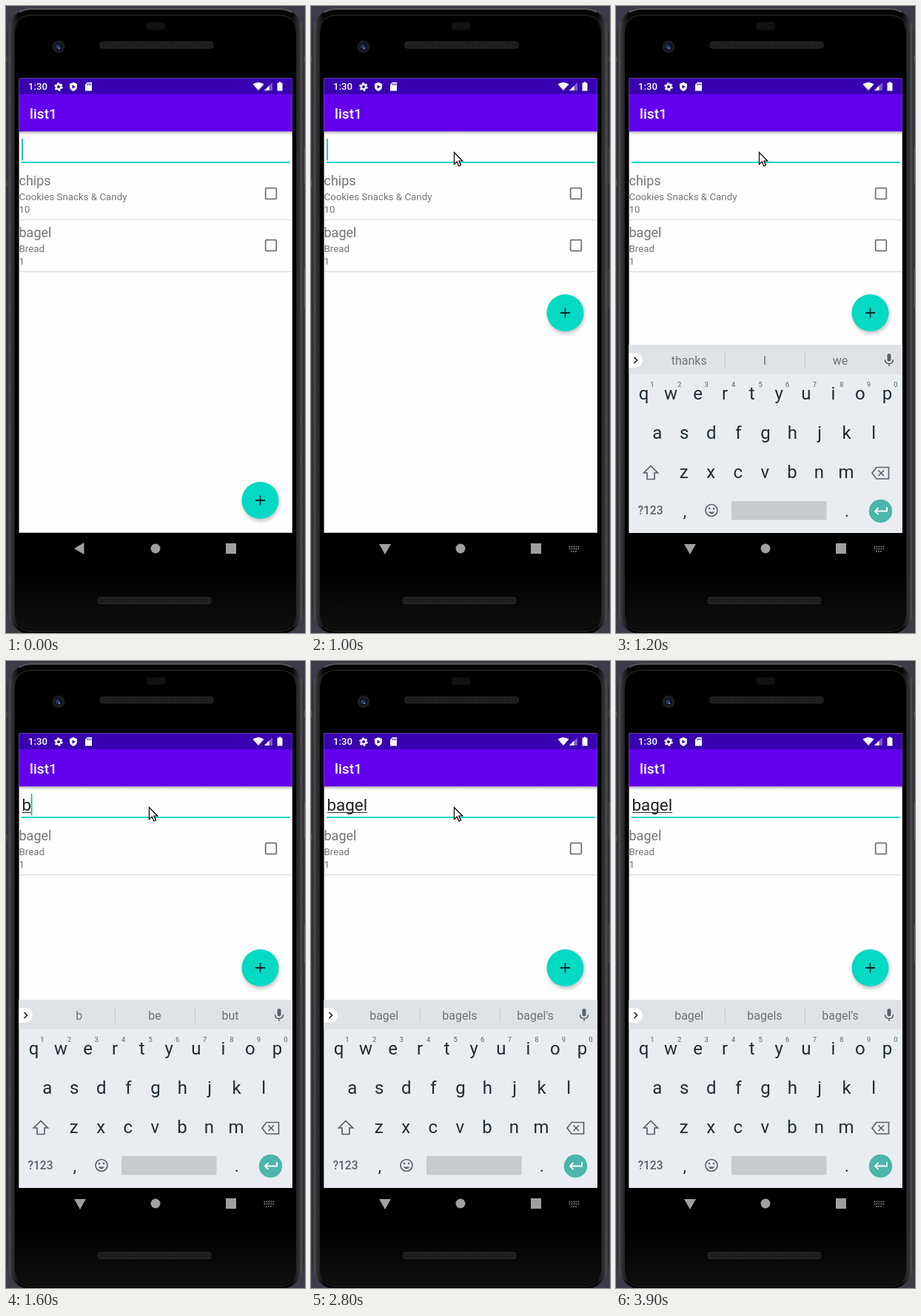
An HTML page that plays this animation: 404 px wide and 846 px high, repeating every 4000 ms.

```html
<!DOCTYPE html>
<html lang="en">
<head>
<meta charset="utf-8">
<title>Shopping list search</title>
<style>
  html, body { margin: 0; width: 100%; height: 100%; overflow: hidden; background: #3b3c48; }
  svg { display: block; width: 404px; height: 846px; font-family: Roboto, sans-serif; }
  .mid { text-anchor: middle; }
  .line { fill: none; stroke: #59636a; stroke-width: 1.7; }
</style>
</head>
<body>
<svg viewBox="0 0 404 846">
  <defs>
    <linearGradient id="side">
      <stop offset="0" stop-color="#242427"/>
      <stop offset=".008" stop-color="#4c4c50"/>
      <stop offset=".018" stop-color="#303033"/>
      <stop offset=".04" stop-color="#050505"/>
      <stop offset=".96" stop-color="#050505"/>
      <stop offset=".982" stop-color="#303033"/>
      <stop offset=".992" stop-color="#4c4c50"/>
      <stop offset="1" stop-color="#242427"/>
    </linearGradient>
    <linearGradient id="chin" x2="0" y2="1">
      <stop offset="0" stop-color="#000"/>
      <stop offset="1" stop-color="#101011"/>
    </linearGradient>
    <linearGradient id="drop" x2="0" y2="1">
      <stop offset="0" stop-opacity=".28"/>
      <stop offset="1" stop-opacity="0"/>
    </linearGradient>
    <pattern id="mesh" width="3" height="3" patternUnits="userSpaceOnUse">
      <path d="M0 0h3v3h-3z" fill="#171717"/><path d="M0 0h1.5v1.5h-1.5z" fill="#303030"/>
    </pattern>
    <filter id="soft" x="-30%" y="-30%" width="160%" height="160%"><feGaussianBlur stdDeviation="2.5"/></filter>
    <clipPath id="screen"><path d="M17.6 97H386.800V715H17.600z"/></clipPath>
  </defs>

  <!-- phone body -->
  <path d="M0 68h4v8h-4zM0 234h6v9h-6zM400 67h4v9h-4zM399 190h5v50h-5zM399 355h5v52h-5z" fill="#55555a"/>
  <rect x="1.500" y="3" width="401" height="845" rx="34" fill="url(#side)"/>
  <path d="M18 8.500Q24 4 36 4H368Q380 4 386 8.500" fill="none" stroke="#58585c" stroke-width="2"/>
  <rect x="7.500" y="12.500" width="389" height="831" rx="26" fill="none" stroke="#2d2d30"/>
  <rect x="12" y="13" width="380" height="829" rx="24" fill="#000"/>
  <path d="M12 765H392V815Q392 842 367 842H37Q12 842 12 815z" fill="url(#chin)"/>
  <rect x="190" y="22" width="25" height="10" rx="3" fill="#111"/>
  <g fill="url(#mesh)" stroke="#2c2c2c">
    <rect x="127" y="48.5" width="153" height="8.5" rx="3"/>
    <rect x="124" y="798" width="153" height="8.5" rx="3"/>
  </g>
  <circle cx="71" cy="55" r="8.5" fill="#1c1c20"/>
  <circle cx="71" cy="55" r="5" fill="#10131f"/>
  <circle cx="70" cy="55" r="2.8" fill="#283868"/>
  <circle cx="72" cy="57" r="1.2" fill="#7486b4"/>

  <!-- app -->
  <g clip-path="url(#screen)">
    <path d="M17 97.500H388V710.800H17z" fill="#fefefe"/>
    <path d="M17 169H388V174H17z" fill="url(#drop)"/>
    <path d="M17 97.500H388V119H17z" fill="#3900b1"/>
    <path d="M17 119H388V169.300H17z" fill="#6200ee"/>
  </g>
  <g fill="#fff">
    <text x="30" y="113.3" font-size="13.2" font-weight="500">1:30</text>
    <text x="32" y="151.5" font-size="19.2" font-weight="500">list1</text>
    <g fill="none" stroke="#fff">
      <circle cx="71" cy="109" r="3.2" stroke-width="2.4"/>
      <circle cx="71" cy="109" r="4.9" stroke-width="1.8" stroke-dasharray="2.6 2.53"/>
    </g>
    <path d="M91 103l5 2v3.5q0 4.5-5 6.5q-5-2-5-6.500v-3.500z"/>
    <path d="M89.500 106.500l4.500 2.500l-4.500 2.500z" fill="#3900b1"/>
    <path d="M110 103h6v11.500h-9v-8.500z"/>
    <path d="M110.500 104.500v2.500M112.500 104.500v2.500M114.500 104.500v2.500" stroke="#3900b1"/>
    <path d="M333.500 105.500q7.500-5 15 0l-7.500 8.500z"/>
    <path d="M360 103v11h-11z" opacity=".35"/>
    <path d="M355.500 107.500v6.500h-6.500z"/>
    <path d="M368.500 102.500h3v1.200h2v10.800h-7v-10.800h2z"/>
  </g>
  <path d="M21 211H383.500" stroke="#10d4c2" stroke-width="1.8"/>
  <text id="query" x="21.500" y="201.500" font-size="22.4" fill="#202020"></text>
  <path id="underline" stroke="#333" stroke-width="1.2"/>
  <path id="caret" stroke="#20bdb0" stroke-width="1.8"/>
  <g id="list"></g>
  <g id="fab">
    <circle cx="344.500" cy="3.500" r="25" opacity=".22" filter="url(#soft)"/>
    <circle cx="343.500" r="25" fill="#03d9c3"/>
    <path d="M337 0H350M343.500-6.500V6.500" stroke="#082b29" stroke-width="1.8"/>
  </g>

  <!-- system navigation -->
  <g fill="#a0a0a0">
    <path id="back"/>
    <circle cx="202" cy="732" r="6.500"/>
    <path d="M297 725h14v14h-14z"/>
    <path id="switcher" d="M348.500 729.500h14M348.500 732.500h14M351 736h9" stroke="#999" stroke-width="1.7" stroke-dasharray="1.700 1.300" fill="none"/>
  </g>

  <g clip-path="url(#screen)">
    <g id="keyboard">
      <path d="M17 457H388V711H17z" fill="#e9edf1"/>
      <path d="M17 457H388V497H17z" fill="#dfe3e7"/>
      <path d="M17 468h9a10 10 0 0 1 0 20h-9z" fill="#fff"/>
      <path d="M24.500 474l4 4l-4 4" class="line" style="stroke:#222"/>
      <path d="M147.500 467v21M255.500 467v21" stroke="#c3c8cc"/>
      <g id="words" class="mid" fill="#6c7479"></g>
      <rect x="366.500" y="469" width="5" height="10.500" rx="2.500" fill="#59636a"/>
      <path d="M363.500 477q0 5.500 5.500 5.500t5.500-5.500M369 482v4" class="line" style="stroke-width:1.500"/>
      <g id="keys" class="mid" fill="#202c33"></g>
      <path d="M47 620.500l9.500 9.500h-4.500v8.500h-10v-8.500h-4.500z" class="line"/>
      <path d="M352 622.500h16.500v15.500h-16.500l-6-7.750zM354.500 626.500l7.500 7.500m0-7.500l-7.500 7.500" class="line"/>
      <circle cx="129" cy="680.500" r="8" class="line"/>
      <path d="M124.500 682.500q4.500 5.500 9 0z" fill="#59636a"/>
      <circle cx="126" cy="678" r="1.300" fill="#59636a"/><circle cx="132" cy="678" r="1.300" fill="#59636a"/>
      <rect x="156" y="668" width="128.500" height="25.500" rx="2" fill="#c7cbcf"/>
      <circle cx="357.500" cy="681.500" r="15.700" fill="#4bb6a9"/>
      <path d="M366 676v5.500H350M354.500 677l-4.500 4.500l4.500 4.500" fill="none" stroke="#fff" stroke-width="1.900"/>
    </g>
  </g>
  <path id="pointer" d="M.5.500v16l3.700-3.500l2.600 6l2.700-1.200l-2.600-5.800h4.800z" fill="#fff" stroke="#000" stroke-width="1.200"/>
</svg>
<script>
const LOOP = 4000, STEP = 100;
const $ = id => document.getElementById(id);
const show = (id, on) => $(id).setAttribute('visibility', on ? 'visible' : 'hidden');
const move = (id, x, y) => $(id).setAttribute('transform', `translate(${x} ${y})`);
const label = (text, x, y, size) => `<text x="${x}" y="${y}" font-size="${size}">${text}</text>`;

const row = (y, name, aisle, count) => `<g transform="translate(0 ${y})" fill="#757575">
  ${label(name, 17.5, 242, 18)}${label(aisle, 17.5, 261.5, 13.3)}${label(count, 17.5, 279.3, 13.3)}
  <rect x="350.700" y="245.700" width="14.600" height="14.600" rx="1" fill="none" stroke="#747474" stroke-width="1.800"/>
  <path d="M18 288.500H386.500" stroke="#dedede" stroke-width="1.500"/></g>`;
const fullList = row(0, 'chips', 'Cookies Snacks &amp; Candy', 10) + row(70, 'bagel', 'Bread', 1);
const filteredList = row(0, 'bagel', 'Bread', 1);

const keyRow = (letters, x, y) => [...letters].map((c, i) => label(c, x + i * 36.55, y, 24)).join('');
$('keys').innerHTML = keyRow('qwertyuiop', 37.5, 531) + keyRow('asdfghjkl', 55.7, 584) + keyRow('zxcvbnm', 91.7, 637)
  + label(',', 93, 689, 22) + label('.', 312, 689, 22)
  + `<g fill="#59636a">${[...'1234567890'].map((c, i) => label(c, 49 + i * 36.55, 513.5, 9.5)).join('')}
     <g font-weight="500">${label('?123', 46.5, 686, 15.6)}</g></g>`;

// Each track lists [start time, value...]; the last started entry holds.
const pointerTrack = [[0], [100, 383, 772], [200, 345, 695], [300, 288, 570], [400, 218, 400], [500, 168, 229],
  [600, 193, 197], [3000, 232, 215], [3100, 290, 245], [3200, 355, 280], [3300]];
const queryTrack = [[0, ''], [1300, 'b'], [1800, 'ba'], [2000, 'bag'], [2100, 'bage'], [2300, 'bagel']];
const wordTrack = [[0, 'thanks', 'I', 'we'], [1400, 'b', 'be', 'but'], [1900, 'ba', 'bad', 'back'],
  [2100, 'bag', 'bags', 'baggage'], [2200, 'bage', 'bagel', 'bagels'], [2400, 'bagel', 'bagels', "bagel's"]];
const caretTrack = [[0, true], [500, false], [700, true], [1200, false], [1300, true], [2800, false], [3300, true], [3800, false]];
const at = (track, t) => track.filter(entry => entry[0] <= t).pop().slice(1);

function draw(t) {
  const [query] = at(queryTrack, t);
  $('query').textContent = query;
  const width = query ? $('query').getComputedTextLength() : 0;
  $('underline').setAttribute('d', width ? `M22 204.500h${width - 0.5}` : '');
  $('caret').setAttribute('d', `M${22 + width} 179v29.500`);
  show('caret', at(caretTrack, t)[0]);

  $('list').innerHTML = t < 1400 ? fullList : filteredList;
  const resized = t >= 1000;
  move('fab', 0, resized ? 414 : 667);
  $('back').setAttribute('d', resized ? 'M92 726h16l-8 14z' : 'M92 732l13.500-8v16z');
  show('switcher', resized);

  show('keyboard', t >= 1100);
  move('keyboard', 0, t < 1200 ? 4 : 0);
  $('keyboard').setAttribute('opacity', t < 1200 ? 0.94 : 1);
  $('words').innerHTML = at(wordTrack, t).map((word, i) => label(word, 98.7 + i * 102.2, 483.5, 16)).join('');

  const tip = at(pointerTrack, t);
  show('pointer', tip.length);
  if (tip.length) move('pointer', ...tip);
}

function tick() {
  draw(Math.floor(performance.now() % LOOP / STEP) * STEP);
  requestAnimationFrame(tick);
}
tick();
</script>
</body>
</html>
```
